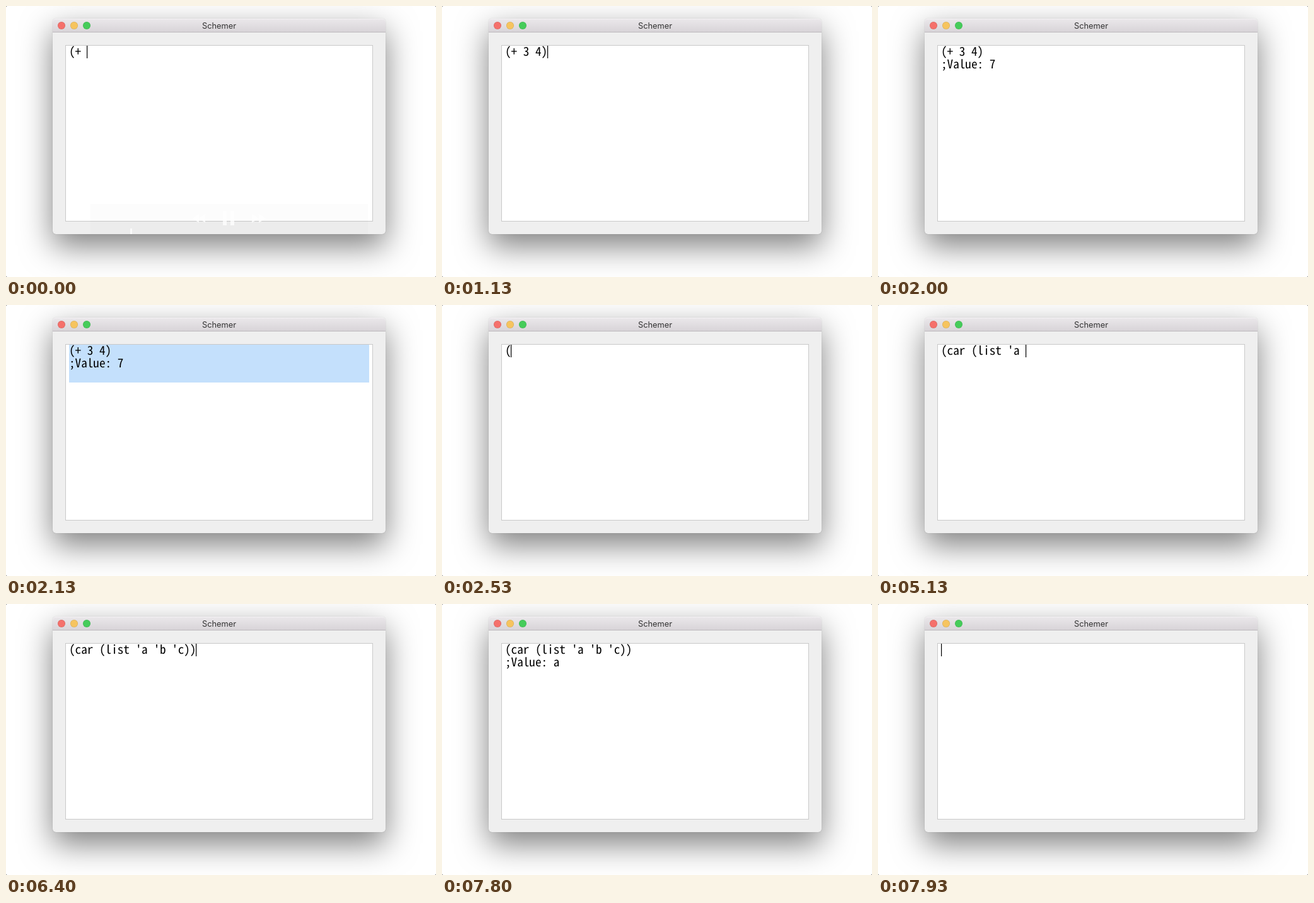
Recreate the animation shown at these times as an HTML page. Size 682 by 430 pixels, loop 8 s.

```html
<!DOCTYPE html>
<html lang="en">
<head>
<meta charset="utf-8">
<title>Schemer</title>
<style>
  html, body { margin: 0; width: 100%; height: 100%; overflow: hidden; background: #555; }
  #stage { position: absolute; left: 0; top: 0; width: 682px; height: 430px; overflow: hidden; background: #fff; border-radius: 2px; }
  #window {
    position: absolute; left: 74px; top: 20px; width: 528px; height: 342px;
    border-radius: 5px; background: #efefef;
    box-shadow: 0 0 1px rgba(0, 0, 0, .35), 0 19px 50px rgba(0, 0, 0, .5);
  }
  #bar {
    box-sizing: border-box; height: 22px; border-radius: 5px 5px 0 0;
    background: linear-gradient(#ebe8eb, #d8d4d8);
    border-bottom: 1px solid #bdb9bd; box-shadow: inset 0 1px #f5f3f5;
    font: 12.8px/23px Inter, Roboto, sans-serif; text-align: center; color: #333;
  }
  .light { position: absolute; top: 5px; width: 12px; height: 12px; border-radius: 50%; box-shadow: inset 0 0 0 .6px rgba(0, 0, 0, .13); }
  #field { position: absolute; box-sizing: border-box; left: 20px; top: 42px; width: 488px; height: 280px; background: #fff; border: 1px solid #c9c9c9; }
  svg { position: absolute; left: 0; top: 0; }
  #code text { fill: #000; text-rendering: geometricPrecision; }
</style>
</head>
<body>
<div id="stage">
  <div id="window">
    <div id="bar">Schemer</div>
    <div class="light" style="left:8px;background:#f5706b"></div>
    <div class="light" style="left:28px;background:#f6c45f"></div>
    <div class="light" style="left:48px;background:#45cc5a"></div>
    <div id="field"></div>
  </div>
  <svg id="code" width="682" height="430">
    <rect id="selection" x="100" y="63" width="476" height="60" fill="#c4e0fc"/>
    <text id="input" x="100" y="79"></text>
    <text id="output" x="100" y="99"></text>
    <rect id="caret" width="1.2" height="20"/>
  </svg>
  <svg id="player" width="682" height="430">
    <path d="M134 314h440v48h-440z" fill="#000" fill-opacity=".012"/>
    <path d="M344 325h6v23h-6zM356 325h6v23h-6zM316 330v14l-10-7zM306 330v14l-10-7zM390 330v14l11-7zM401 330v14l11-7zM197 353h3v9h-3z" fill="#fff" fill-opacity=".8"/>
  </svg>
</div>
<script>
const LOOP = 8000, ADVANCE = 9.6, LINE = 20, LEFT = 100, TOP = 63;
const CARET_ON = 540, FADE = 400;
const $ = id => document.getElementById(id);

// Time of each key; words name editor commands.
const keys = [
  [0, '(+ '], [265, '3'], [400, ' '], [665, '4'], [925, ')'],
  [1325, 'eval', ';Value: 7'], [2065, 'select'], [2195, 'clear'],
  [2525, '('], [2665, 'c'], [2795, 'a'], [2995, 'r'], [3195, ' '],
  [3525, '('], [3665, 'l'], [3795, 'i'], [3930, 's'], [4065, 't'], [4195, ' '],
  [4525, "'"], [4725, 'a'], [4925, ' '], [5195, "'"], [5325, 'b'],
  [5525, ' '], [5725, "'"], [5865, 'c'], [6125, ')'], [6395, ')'],
  [6725, 'eval', ';Value: a'], [7865, 'select'], [7925, 'clear']
];

function editorAt(t) {
  let input = '', output = '', selected = false, last = 0;
  for (const [time, key, result] of keys) {
    if (time > t) break;
    last = time;
    if (key === 'eval') output = result;
    else if (key === 'select') selected = true;
    else if (key === 'clear') { input = output = ''; selected = false; }
    else input += key;
  }
  return { input, output, selected, caret: !selected && t - last < CARET_ON };
}

// Choose the type size that gives the wanted character advance.
function fitFont() {
  const family = '"Noto Sans Mono CJK JP", "Noto Sans Mono", monospace';
  const ctx = document.createElement('canvas').getContext('2d');
  ctx.font = `100px ${family}`;
  const size = ADVANCE * 100 / ctx.measureText('a').width;
  for (const id of ['input', 'output']) {
    $(id).style.fontFamily = family;
    $(id).style.fontSize = size + 'px';
  }
}

const show = (el, on) => el.setAttribute('visibility', on ? 'visible' : 'hidden');

function draw() {
  const t = performance.now() % LOOP;
  const { input, output, selected, caret } = editorAt(t);
  $('input').textContent = input;
  $('output').textContent = output;
  show($('selection'), selected);
  show($('caret'), caret);
  // After a result the caret rests below a blank line.
  $('caret').setAttribute('x', output ? LEFT : Math.floor(LEFT + input.length * ADVANCE));
  $('caret').setAttribute('y', output ? TOP + 3 * LINE : TOP);
  $('player').style.opacity = Math.max(0, 1 - t / FADE);
  requestAnimationFrame(draw);
}

fitFont();
draw();
</script>
</body>
</html>
```
